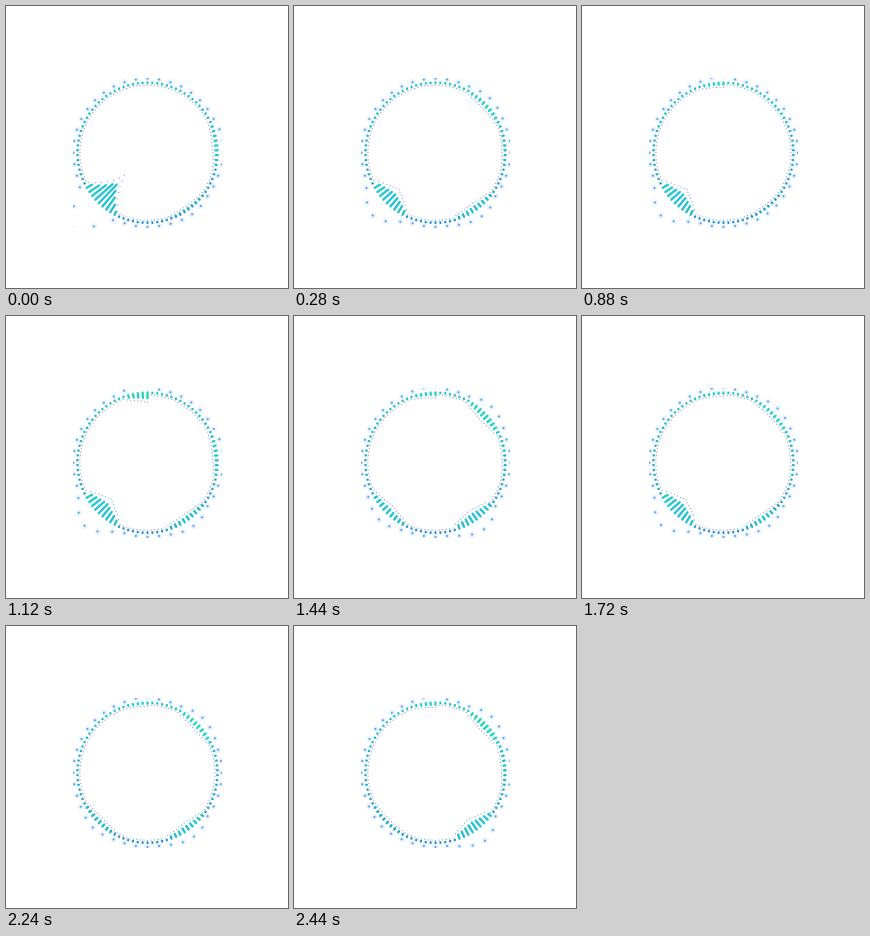
Recreate the animation shown at these times as an HTML page with a canvas. Size 282 by 282 pixels, loop 2480 ms.

```html
<!DOCTYPE html>
<html lang="en">
<head>
<meta charset="utf-8">
<title>Audio ring</title>
<style>
  html, body { margin: 0; width: 100%; height: 100%; overflow: hidden; background: #fff; }
  canvas { display: block; }
</style>
</head>
<body>
<canvas id="stage" width="282" height="282"></canvas>
<script>
const ctx = document.getElementById('stage').getContext('2d');
const LOOP = 2480, STEP = 40, CX = 141.5, CY = 146.7;
const DECAY = 350, SPREAD = 19;

// Each band sits at an angle and is struck by hits of [time, strength].
const bands = [
  { angle: -90, after: 3, hits: [[600, 4], [1080, 5], [1900, 2], [2300, 2]] },
  { angle: -43, hits: [[200, 3], [1360, 5.5], [1900, 7], [2300, 4]] },
  { angle: -6, hits: [[0, 2], [1080, 2], [2300, 2]] },
  { angle: 55, hits: [[0, 1.5], [200, 4], [1040, 4], [1360, 7], [1900, 9], [2300, 9]] },
  { angle: 135, hits: [[0, 27], [600, 22], [1040, 8], [1700, 10]] }
];

// A hit jumps up at once and then dies away.
function energy(hits, t) {
  return hits.reduce((sum, [start, strength]) =>
    t < start ? sum : sum + strength * Math.exp((start - t) / DECAY), 0);
}

// Small bumps are rounded, strong ones become pointed.
function bump(offset, after, height) {
  const p = Math.max(0, 1 - Math.abs(offset) / (offset < 0 ? SPREAD : after));
  return height * p ** Math.min(1, Math.max(0.5, height / 25));
}

function levelsAt(t) {
  const heights = bands.map(band => energy(band.hits, t));
  return angle => bands.reduce((sum, band, i) => {
    const offset = (angle - band.angle + 540) % 360 - 180;
    return sum + bump(offset, band.after || SPREAD, heights[i]);
  }, 0);
}

function around(count, draw) {
  for (let i = 0; i < count; i++) {
    const angle = -90 + i * 360 / count, rad = angle * Math.PI / 180;
    draw(angle, r => [CX + r * Math.cos(rad), CY + r * Math.sin(rad)], rad);
  }
}

function dot([x, y], r, color) {
  ctx.fillStyle = color;
  ctx.beginPath();
  ctx.arc(x, y, r, 0, 2 * Math.PI);
  ctx.fill();
}

// Quiet bars are blue, louder and higher ones turn green.
function barColor(rad, level) {
  const hue = 194 + 9 * Math.sin(rad) - 15 * Math.min(1, level / 3);
  return `hsl(${hue}, 74%, 48%)`;
}

function render(t) {
  const level = levelsAt(t);
  ctx.clearRect(0, 0, 282, 282);
  ctx.save();
  ctx.beginPath();
  ctx.rect(67, 72, 149, 150);
  ctx.clip();

  around(40, (angle, point) => {
    const p = point(74.2 + 1.2 * level(angle));
    dot(p, 3.4, 'rgba(90, 160, 255, 0.08)');
    dot(p, 2, 'rgba(90, 160, 255, 0.15)');
    dot(p, 1, '#4f9ff6');
  });

  ctx.lineWidth = 2.3;
  ctx.lineCap = 'round';
  around(90, (angle, point, rad) => {
    const height = level(angle);
    ctx.strokeStyle = barColor(rad, height);
    ctx.beginPath();
    ctx.moveTo(...point(70.2));
    ctx.lineTo(...point(69.8 - height));
    ctx.stroke();
  });

  around(120, (angle, point) => dot(point(67.6 - 1.3 * level(angle)), 0.6, '#8299c0'));
  ctx.restore();
}

function frame(now) {
  const t = now % LOOP;
  render(t - t % STEP);
  requestAnimationFrame(frame);
}
requestAnimationFrame(frame);
</script>
</body>
</html>
```
